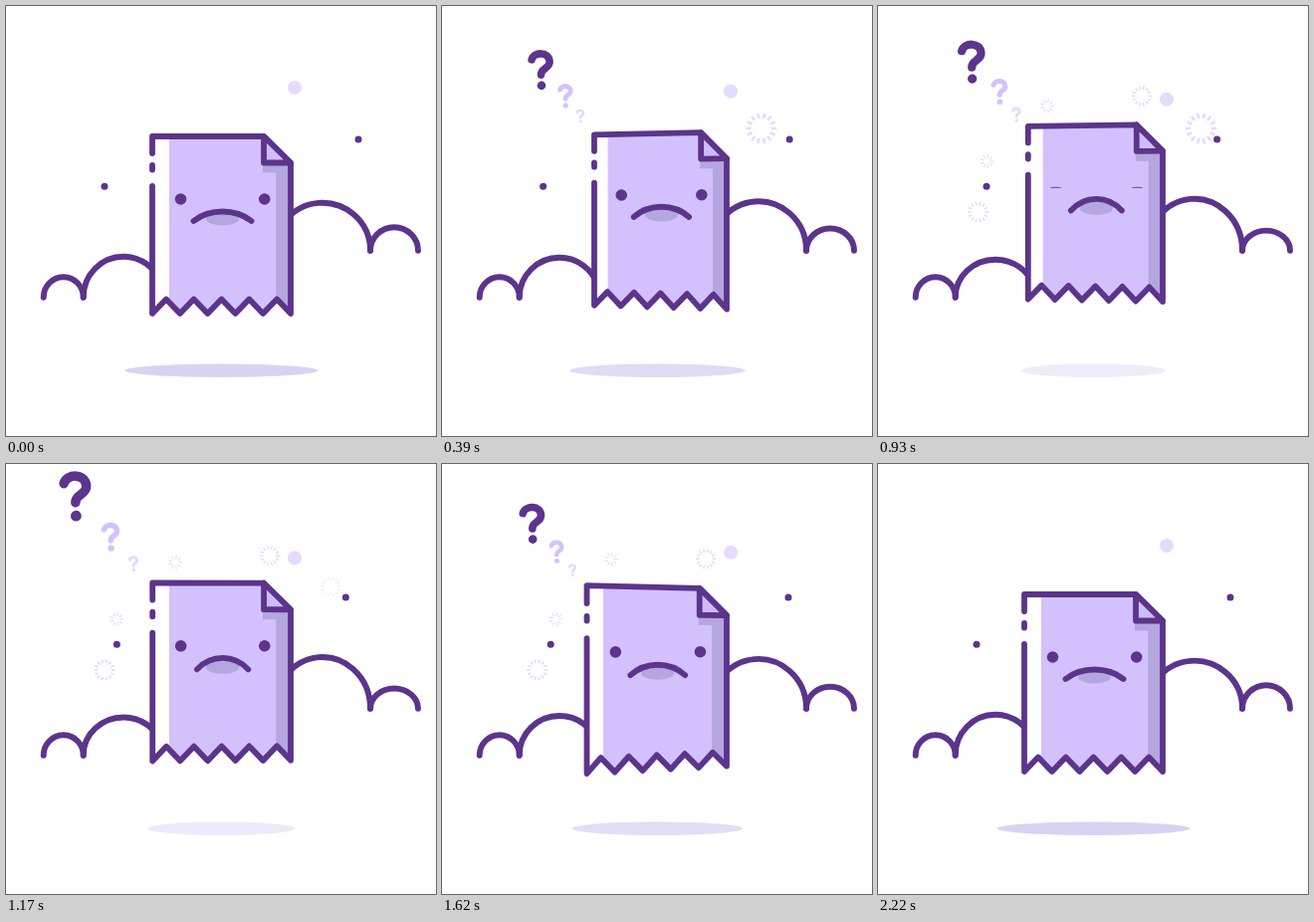
An HTML page with a canvas that plays this animation: 432x432 px, repeating every 2.25 s.

```html
<!DOCTYPE html>
<html lang="en">
<head>
<meta charset="utf-8">
<title>Sad page</title>
<style>
html, body { margin: 0; width: 100%; height: 100%; overflow: hidden; background: #fff; }
canvas { display: block; width: 432px; height: 432px; }
</style>
</head>
<body>
<canvas id="stage" width="432" height="432"></canvas>
<script>
const c = document.getElementById('stage').getContext('2d');
const LOOP = 2250, STEP = 30, TAU = Math.PI * 2;
const INK = '#5c348b', LILAC = '#d3c1fe', SHADE = '#b4a6df', PALE = '#e3dafd';

// near: offset after popping out, far: extra offset after the second push
const MARKS = [
  { color: PALE, near: [1, -13], far: [-11, -9], height: 15, growth: 1 },
  { color: LILAC, near: [-16, -36], far: [-17, -13], height: 26, growth: 3 },
  { color: INK, near: [-44, -66], far: [-24.5, -24], height: 43, growth: 7 }
];

// Appear in order, the later ones in pairs, drifting along dx, dy
const BURSTS = [
  { x: 318, y: 123, dx: 1, dy: 0, r: 15.5 },
  { x: 170, y: 107, dx: 0, dy: -1, r: 7 },
  { x: 103, y: 156, dx: 1, dy: 0, r: 7 },
  { x: 265, y: 84, dx: 0, dy: 1, r: 10 },
  { x: 107, y: 207, dx: -1, dy: 0, r: 10.5 }
];

const clamp = v => Math.max(0, Math.min(1, v));

// Smooth rise from 0 to 1 between two times
function ramp(t, from, to) {
  const s = clamp((t - from) / (to - from));
  return s * s * (3 - 2 * s);
}

const pulse = (t, from, peak, to) => ramp(t, from, peak) * (1 - ramp(t, peak, to));

function liftAt(t) {
  const a = t / LOOP * TAU;
  return (1 - Math.cos(a + .38 * Math.sin(a / 2))) / 2;
}

function ellipse(x, y, rx, ry, color) {
  c.fillStyle = color;
  c.beginPath();
  c.ellipse(x, y, rx, ry, 0, 0, TAU);
  c.fill();
}

function line(points, close) {
  c.beginPath();
  points.forEach(p => c.lineTo(...p));
  if (close) c.closePath();
}

function cloudArc(x, y, rx, ry, from = Math.PI, to = TAU) {
  c.beginPath();
  c.ellipse(x, y, rx, ry, 0, from, to);
  c.stroke();
}

function burst({ x, y, dx, dy, r }, order, t) {
  const small = r < 8, on = 60 + 280 * Math.ceil(order / 2), off = on + (small ? 1430 : 1000);
  const size = ramp(t, on, on + 160) * (1 - ramp(t, off, off + 200));
  if (!size) return;
  const drift = t * .007, radius = r * (.4 + .6 * size);
  const inner = small ? .45 : .66, rays = small ? 9 : 14;
  c.save();
  c.translate(x + dx * drift, y + dy * drift);
  c.globalAlpha = size;
  c.strokeStyle = PALE;
  c.lineWidth = radius * .16;
  c.scale(radius, radius);
  c.lineWidth = .16;
  c.lineCap = 'butt';
  for (let i = 0; i < rays; i++) {
    c.rotate(TAU / rays);
    line([[inner, 0], [1, 0]]);
    c.stroke();
  }
  c.restore();
}

function questionMark({ color, near, far, height, growth }, t) {
  const push = ramp(t, 930, 1180), size = ramp(t, 100, 470) * (1 - ramp(t, 1480, 1860));
  if (!size) return;
  const scale = (height + growth * push) / 50 * size ** .6;
  c.save();
  c.translate(138 + size * (near[0] + far[0] * push), 122 + size * (near[1] + far[1] * push ** 2));
  c.scale(scale, scale);
  c.rotate(-.04);
  c.strokeStyle = color;
  c.lineWidth = 9.5;
  c.beginPath();
  c.moveTo(-11, -13);
  c.bezierCurveTo(-8, -23, 11.5, -23, 11.5, -9.5);
  c.bezierCurveTo(11.5, -1, 0, -2, 0, 6.5);
  c.stroke();
  ellipse(0, 20, 5.4, 5.4, color);
  c.restore();
}

function paper(t, lift) {
  const back = pulse(t, 0, 580, 1260), front = pulse(t, 1050, 1600, 2220);
  const edge = 8 * back - 1.5 * front, top = 3.7 * back - 3.6 * front, bottom = -5.3 * back + 7.5 * front;
  // Shears the flat page around its right side
  const at = (x, y) => {
    const u = (286 - x) / 139, v = (y - 131) / 178;
    return [x + edge * u, y - 12 * lift + u * (top + (bottom - top) * v)];
  };
  const zigzag = Array.from({ length: 11 }, (_, i) => at(286 - 13.9 * i, i % 2 ? 294.5 : 309));
  const head = [at(147, 131), at(259, 131), at(286, 157.5)];

  c.save();
  line([...head, ...zigzag], true);
  c.fillStyle = '#fff';
  c.fill();
  c.clip();
  c.fillStyle = LILAC;
  c.fillRect(164 + 3.5 * back - 2 * front, 90, 140, 240);
  c.fillStyle = SHADE;
  line([at(258, 157), at(290, 157), at(290, 315), at(271.3, 315), at(271.3, 167.5), at(258, 167.5)], true);
  c.fill();
  c.restore();

  c.strokeStyle = INK;
  c.lineWidth = 5.8;
  line([at(147, 148), ...head, ...zigzag, at(147, 181)]);
  c.stroke();
  line([at(147, 160), at(147, 164.5)]);
  c.stroke();
  line([at(259, 131), at(259, 157.5), at(286, 157.5)], true);
  c.fillStyle = '#cdbdf9';
  c.fill();
  c.stroke();

  const open = clamp(Math.abs(t - 930) / 90);
  for (const x of [175.5, 259.7]) ellipse(...at(x, 194), 5.8, Math.max(.5, 5.8 * open), INK);

  const half = 29 - 3.5 * lift, rise = (9.5 + 2.2 * lift) * 1.33;
  const [x, y] = at(217.5, 216 + 1.6 * lift);
  ellipse(x, y - 2, 16.5, 6.5, SHADE);
  c.beginPath();
  c.moveTo(x - half, y);
  c.bezierCurveTo(x - half * .45, y - rise, x + half * .45, y - rise, x + half, y);
  c.stroke();
}

function draw(t) {
  const lift = liftAt(t);
  c.clearRect(0, 0, 432, 432);
  c.lineCap = c.lineJoin = 'round';

  c.globalAlpha = 1 - .58 * lift;
  ellipse(216.5, 366.3, 97 - 24.5 * lift, 6.7, '#dad2f2');
  c.globalAlpha = 1;

  BURSTS.forEach((b, i) => burst(b, i, t));
  ellipse(290, 82 + 12.4 * pulse(t, 0, 1080, 2220), 7, 7, '#e4dbfe');
  ellipse(99 + 13 * pulse(t, 0, 1350, LOOP), 181.3, 3.5, 3.5, INK);
  ellipse(354 - 13.5 * lift, 134, 3.5, 3.5, INK);
  MARKS.forEach(m => questionMark(m, t));

  c.strokeStyle = INK;
  c.lineWidth = 5.9;
  cloudArc(57.7, 292.7, 20, 20.5);
  cloudArc(118, 292.7, 40.3, 41 - 3 * lift, Math.PI, TAU - .3);
  cloudArc(318, 245.7, 48, 48 + 4 * lift, Math.PI + .7);
  cloudArc(390, 245.7, 24, 23.5 - 3.5 * lift);

  paper(t, lift);
}

const start = performance.now();
function frame() {
  const t = (performance.now() - start) % LOOP;
  draw(Math.floor(t / STEP) * STEP);
  requestAnimationFrame(frame);
}
frame();
</script>
</body>
</html>
```
